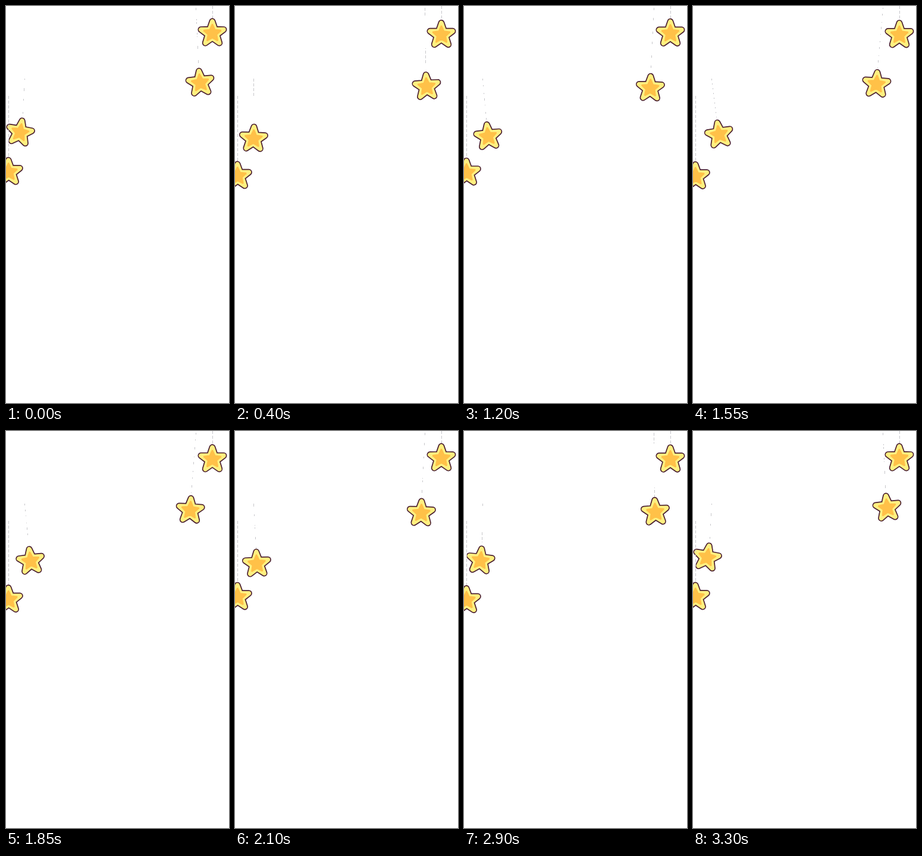
These frames come from a looping animation (375 by 667 pixels, 3350 ms). An HTML page with a canvas:

```html
<!DOCTYPE html>
<html lang="en">
<head>
<meta charset="utf-8">
<title>Hanging stars</title>
<style>
  html, body { margin: 0; width: 100%; height: 100%; overflow: hidden; background: #fff; }
  canvas { display: block; }
</style>
</head>
<body>
<canvas id="stage" width="375" height="667"></canvas>
<script>
const ctx = document.getElementById('stage').getContext('2d');
const STEP = 50, LOOP = 3350, BOB = 1100;
const ROPE = '#c6c6ca', DARK = '#4b2030', PALE = '#fff080', GOLD = '#ffc148';

// Each pose: time, centre x, centre y, tilt in degrees
const rightSwing = [
  [0, 326.6, 129.2, -6], [860, 317, 143.5, 0], [1620, 308.2, 131, 4],
  [2500, 317, 143.5, 0], [3300, 326.6, 129.2, -6]
];
const leftSwing = [
  [0, 23.6, 212.6, 10], [560, 33.2, 226, 0], [1600, 44.2, 215.8, -9],
  [2350, 33.8, 226, 0], [3300, 23.6, 212.6, 10]
];

const mix = (a, b, p) => a + (b - a) * p;
const ease = p => mix(p, (1 - Math.cos(Math.PI * p)) / 2, 0.75);

function poseAt(keys, t) {
  let i = 0;
  while (i < keys.length - 2 && t >= keys[i + 1][0]) i++;
  const a = keys[i], b = keys[i + 1];
  const p = ease((t - a[0]) / (b[0] - a[0]));
  return { x: mix(a[1], b[1], p), y: mix(a[2], b[2], p), tilt: mix(a[3], b[3], p) };
}

function starPath(outer, inner) {
  ctx.beginPath();
  for (let i = 0; i < 10; i++) {
    const r = i % 2 ? inner : outer, a = i * Math.PI / 5;
    ctx.lineTo(r * Math.sin(a), -r * Math.cos(a));
  }
  ctx.closePath();
}

function layer(outer, inner, width, color) {
  starPath(outer, inner);
  ctx.lineWidth = width;
  ctx.strokeStyle = ctx.fillStyle = color;
  ctx.stroke();
  ctx.fill();
}

function star(x, y, tilt) {
  ctx.save();
  ctx.translate(x, y);
  ctx.rotate(tilt * Math.PI / 180);
  ctx.lineJoin = 'round';
  layer(20, 8, 11, DARK);
  layer(20, 8, 7.6, PALE);
  layer(14.5, 7, 3, GOLD);
  ctx.restore();
}

// Dashed hairline: a row shows only where the line runs near a pixel centre
function rope(x0, y0, x1, y1) {
  ctx.fillStyle = ROPE;
  for (let y = y0; y < y1; y++) {
    const x = mix(x0, x1, (y - y0) / (y1 - y0));
    const col = Math.floor(x);
    if ((y - y0) % 8 < 5 && Math.abs(x - col - 0.5) < 0.16) ctx.fillRect(col, y, 1, 1);
  }
}

function hung(keys, t, x0, y0) {
  const { x, y, tilt } = poseAt(keys, t), a = tilt * Math.PI / 180;
  rope(x0, y0, x + 25 * Math.sin(a), Math.round(y - 25 * Math.cos(a)));
  star(x, y, tilt);
}

function bobbing(x, y, drop, top, t, tilt) {
  const cy = y + drop * (1 - Math.cos(2 * Math.PI * (t + 40) / BOB)) / 2;
  const col = Math.floor(x) + 0.5;
  rope(col, top, col, Math.round(cy - 25));
  star(x, cy, tilt);
}

function draw(now) {
  const t = Math.floor(now % LOOP / STEP) * STEP;
  ctx.fillStyle = '#fff';
  ctx.fillRect(0, 0, 375, 667);
  hung(rightSwing, t, 319.5, 3);
  bobbing(347, 45.8, 3, 0, t, 0);
  hung(leftSwing, t, 31.4, 122);
  bobbing(4.4, 279, 7.6, 151, t, -1);
}

const start = performance.now();
function tick() {
  draw(performance.now() - start);
  requestAnimationFrame(tick);
}
tick();
</script>
</body>
</html>
```
